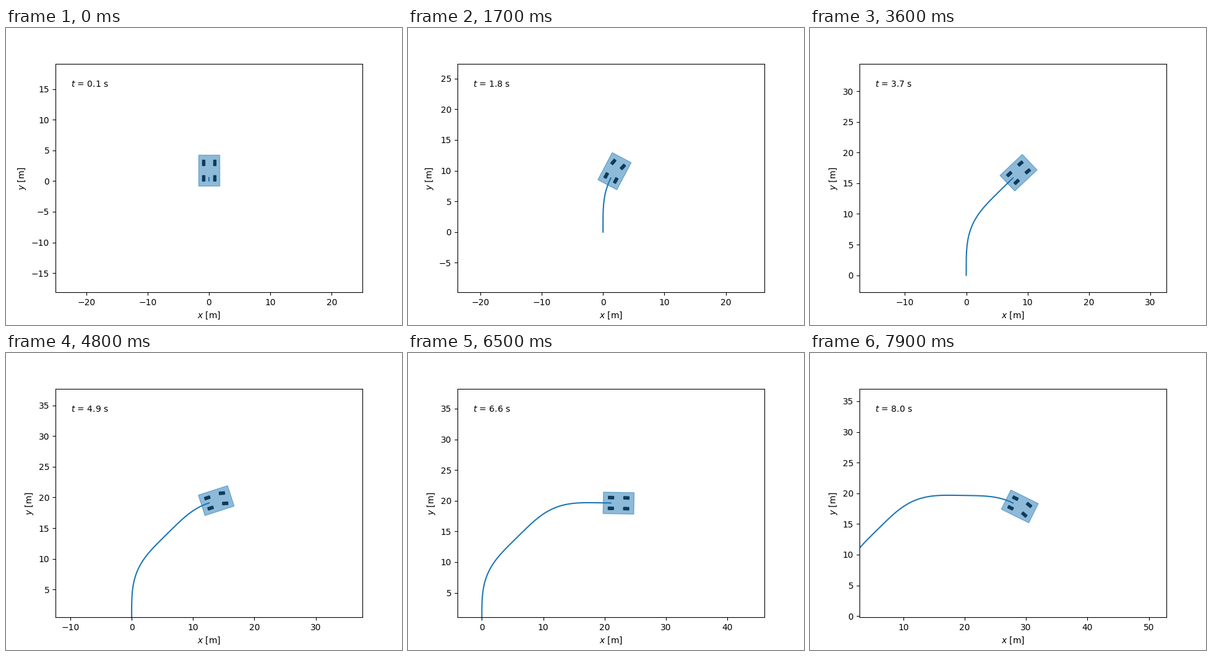
Write a matplotlib script that moves like this. It is 640 px wide and 480 px high and loops after 8000 ms.

```python
import numpy as np
import matplotlib.pyplot as plt
from matplotlib.animation import FuncAnimation

BASE, TRACK = 2.5, 1.75   # wheelbase and track width [m]
SPEED, DT, STEPS = 5.0, 0.1, 80
VIEW_W = 10 * BASE        # half width of the view
VIEW_H = VIEW_W * 369.6 / 496


def rates(state, steer_rate):
    _, _, heading, steer = state
    return np.array([
        SPEED * np.cos(heading),
        SPEED * np.sin(heading),
        SPEED * np.tan(steer) / BASE,
        steer_rate,
    ])


def rk4(state, u):
    k1 = rates(state, u)
    k2 = rates(state + DT * k1 / 2, u)
    k3 = rates(state + DT * k2 / 2, u)
    k4 = rates(state + DT * k3, u)
    return state + DT * (k1 + 2 * k2 + 2 * k3 + k4) / 6


def simulate():
    states = [np.array([0, 0, np.pi / 2, 0])]
    for k in range(STEPS):
        states.append(rk4(states[-1], -0.25 * np.sin(2 * k * DT)))
    return np.array(states)


def rotate(points, angle):
    c, s = np.cos(angle), np.sin(angle)
    return np.asarray(points) @ np.array([[c, s], [-s, c]])


def box(center, length, width, angle):
    corners = np.array([(-1, -1), (1, -1), (1, 1), (-1, 1), (-1, -1)])
    return center + rotate(corners * (length / 2, width / 2), angle)


path = simulate()

fig, ax = plt.subplots(figsize=(6.4, 4.8), dpi=100)
ax.set_xlabel(r"$x$ [m]")
ax.set_ylabel(r"$y$ [m]")
line, = ax.plot([], [], "C0")
wheels = [ax.fill([0, 1, 1], [0, 0, 1], color="k")[0] for _ in range(4)]
body, = ax.fill([0, 1, 1], [0, 0, 1], color="C0", alpha=0.5)
clock = ax.text(0.05, 0.9, "", transform=ax.transAxes)


def update(i):
    k = i + 1
    x, y, heading, steer = path[k]
    pos = np.array([x, y])

    # Each front wheel turns about the same centre.
    tan = np.tan(steer)
    left = np.arctan(2 * BASE * tan / (2 * BASE - TRACK * tan))
    right = np.arctan(2 * BASE * tan / (2 * BASE + TRACK * tan))
    mounts = [(0, 1, 0), (0, -1, 0), (BASE, 1, left), (BASE, -1, right)]
    for wheel, (along, side, turn) in zip(wheels, mounts):
        hub = pos + rotate((along, side * TRACK / 2), heading)
        wheel.set_xy(box(hub, TRACK / 2, TRACK / 4, heading + turn))
    middle = pos + rotate((BASE / 2, 0), heading)
    body.set_xy(box(middle, 2 * BASE, 2 * TRACK, heading))

    line.set_data(path[:k + 1, 0], path[:k + 1, 1])
    clock.set_text(f"$t$ = {k * DT:.1f} s")
    ax.set_xlim(x - VIEW_W, x + VIEW_W)
    ax.set_ylim(y - VIEW_H, y + VIEW_H)
    return [line, *wheels, body, clock]


ani = FuncAnimation(fig, update, frames=STEPS, interval=100,
                    repeat=True, repeat_delay=0, blit=False)
plt.show()
```
